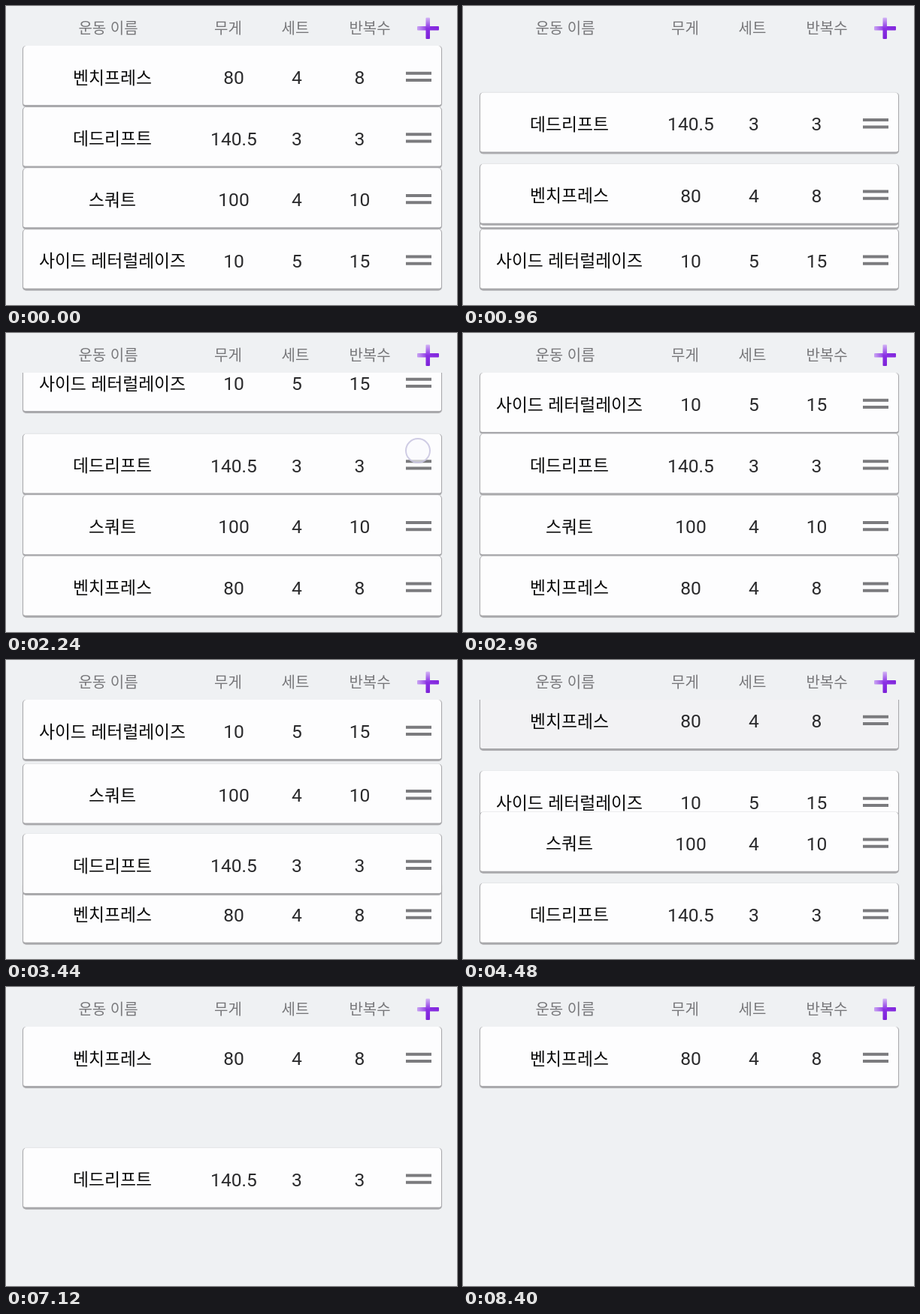
An HTML page for the animation above (8.6 s loop, 600 by 399 pixels).

```html
<!DOCTYPE html>
<html lang="ko">
<head>
<meta charset="utf-8">
<title>운동 목록</title>
<style>
  html, body { margin: 0; width: 100%; height: 100%; overflow: hidden; background: #eff1f3; }
  #stage { position: relative; width: 600px; height: 399px; overflow: hidden; }
  svg { position: absolute; left: 0; top: 0; display: block; }
  text { text-anchor: middle; font-family: "Noto Sans CJK KR", "Noto Sans CJK", sans-serif; }
  .head text { font-size: 20px; fill: #77777a; }
  #list { position: absolute; left: 21px; top: 53px; width: 560px; height: 346px; overflow: hidden; }
  .row { position: absolute; left: 0; top: 0; width: 560px; height: 83px; }
  .card { position: absolute; left: 1px; top: 0; width: 558px; height: 82px; box-sizing: border-box;
    background: #fdfdfe; border: solid #a9a9ac; border-width: 0 1.5px 3px; border-radius: 5px;
    box-shadow: 0 0 1px #b5b5b8; }
  .name { font-size: 22.8px; fill: #080808; font-weight: 500; }
  .num { font-family: Roboto, sans-serif; font-size: 24.6px; fill: #2a2a2c; }
  #pointer { position: absolute; left: -17px; top: -17px; width: 34px; height: 34px; box-sizing: border-box;
    border: 2.5px solid rgba(196, 192, 222, .8); border-radius: 50%; background: rgba(250, 250, 253, .6); }
</style>
</head>
<body>
<div id="stage">
  <svg class="head" width="600" height="53">
    <defs>
      <linearGradient id="across"><stop offset="0" stop-color="#c9a4f3"/><stop offset=".5" stop-color="#8a30e4"/><stop offset="1" stop-color="#8228dc"/></linearGradient>
      <linearGradient id="down" x2="0" y2="1"><stop offset="0" stop-color="#d2b4f5"/><stop offset=".5" stop-color="#8a30e4"/><stop offset="1" stop-color="#7c22d8"/></linearGradient>
    </defs>
    <text x="136" y="36.5">운동 이름</text>
    <text x="295.5" y="36.5">무게</text>
    <text x="385" y="36.5">세트</text>
    <text x="484" y="36.5">반복수</text>
    <rect x="547" y="27" width="29" height="5.5" rx="1" fill="url(#across)"/>
    <rect x="558.5" y="15.5" width="5.5" height="28.5" rx="1" fill="url(#down)"/>
  </svg>
  <div id="list"></div>
  <div id="pointer"></div>
</div>
<script>
const LOOP = 8600, SLOT = 81.6, AWAY = -565;
const SINE = 'cubic-bezier(.37,0,.63,1)';
const list = document.getElementById('list');
const pointer = document.getElementById('pointer');

// Loops keyframes given as [ms, value]; the last value holds to the end.
function play(el, prop, track, easing = SINE) {
  const frames = track.map(([ms, value]) => ({ offset: ms / LOOP, [prop]: value, easing }));
  frames.push({ offset: 1, [prop]: track[track.length - 1][1] });
  el.animate(frames, { duration: LOOP, iterations: Infinity });
}

const move = (el, track) => play(el, 'translate', track.map(([ms, y, x = 0]) => [ms, `${x}px ${y}px`]));
const step = (el, prop, track) => play(el, prop, track, 'step-end');
const slot = (ms, index, x) => [ms, index * SLOT, x];

// path: [ms, y, x]; lifted: [start, end] spans during which the row is on top
const rows = [
  { name: '사이드 레터럴레이즈', nums: ['10', '5', '15'], lifted: [[1720, 2560]], path: [
    slot(0, 3), slot(1060, 3), slot(1310, 2),
    slot(1740, 2), [2200, -30], [2280, -26], slot(2540, 0),
    slot(4048, 0), slot(4298, 2), slot(4548, 1),
    slot(5680, 1), slot(6060, 1, AWAY)] },
  { name: '데드리프트', nums: ['140.5', '3', '3'], lifted: [[2960, 3760]], path: [
    slot(0, 1), slot(880, 1), slot(1130, 0),
    slot(1950, 0), slot(2200, 1),
    slot(2960, 1), [3440, 179], [3520, 195], slot(3740, 2),
    slot(3960, 2), slot(4210, 3),
    slot(6180, 3), slot(6430, 2), slot(7100, 2), slot(7350, 1),
    slot(7780, 1), slot(8110, 1, AWAY)] },
  { name: '스쿼트', nums: ['100', '4', '10'], lifted: [], path: [
    slot(0, 2), slot(970, 2), slot(1220, 1),
    slot(1850, 1), slot(2100, 2),
    slot(3226, 2), slot(3476, 1),
    slot(4298, 1), slot(4548, 2),
    slot(6180, 2), slot(6430, 1),
    slot(6660, 1), slot(6910, 1, AWAY)] },
  { name: '벤치프레스', nums: ['80', '4', '8'], lifted: [[680, 1440], [3840, 4700]], path: [
    slot(0, 0), slot(680, 0), [1180, 264], [1240, 264], slot(1430, 3),
    slot(3840, 3), [4340, -24], [4480, -14], slot(4680, 0)] },
];

const columns = [282, 366, 449.5];

for (const { name, nums, lifted, path } of rows) {
  const row = document.createElement('div');
  row.className = 'row';
  row.innerHTML = `<div class="card"></div><svg width="560" height="82">
    <text class="name" x="120.5" y="50.5">${name}</text>
    ${nums.map((n, i) => `<text class="num" x="${columns[i]}" y="51">${n}</text>`).join('')}
    <path d="M511 36.7h34M511 46h34" stroke="#7b7b7e" stroke-width="4"/></svg>`;
  list.append(row);
  move(row, path);
  step(row, 'zIndex', [[0, 0], ...lifted.flatMap(([from, to]) => [[from, 1], [to, 0]])]);
  if (name === '벤치프레스') {
    play(row.firstChild, 'backgroundColor',
      [[0, '#fdfdfe'], [4240, '#fdfdfe'], [4400, '#f2f2f4'], [4520, '#f2f2f4'], [4700, '#fdfdfe']]);
  }
}

// Touches as [ms, y, x] points; the ring shows from the first to the last.
const touches = [
  [[680, 90, 548], [1180, 358, 548], [1240, 358, 548]],
  [[1720, 258, 548], [2080, 157, 548], [2320, 157, 548]],
  [[2960, 186, 546], [3440, 290, 538], [3520, 306, 538]],
  [[3840, 345, 550], [4340, 80, 557], [4480, 90, 557], [4560, 94, 557]],
  [[5680, 176, 470], [6000, 176, 90]],
  [[6660, 176, 470], [6860, 176, 120]],
  [[7780, 176, 470], [8060, 176, 110]],
];
move(pointer, [[0, 90, 548], ...touches.flat()]);
step(pointer, 'opacity', [[0, 0], ...touches.flatMap(t => [[t[0][0], 1], [t[t.length - 1][0], 0]])]);
</script>
</body>
</html>
```
